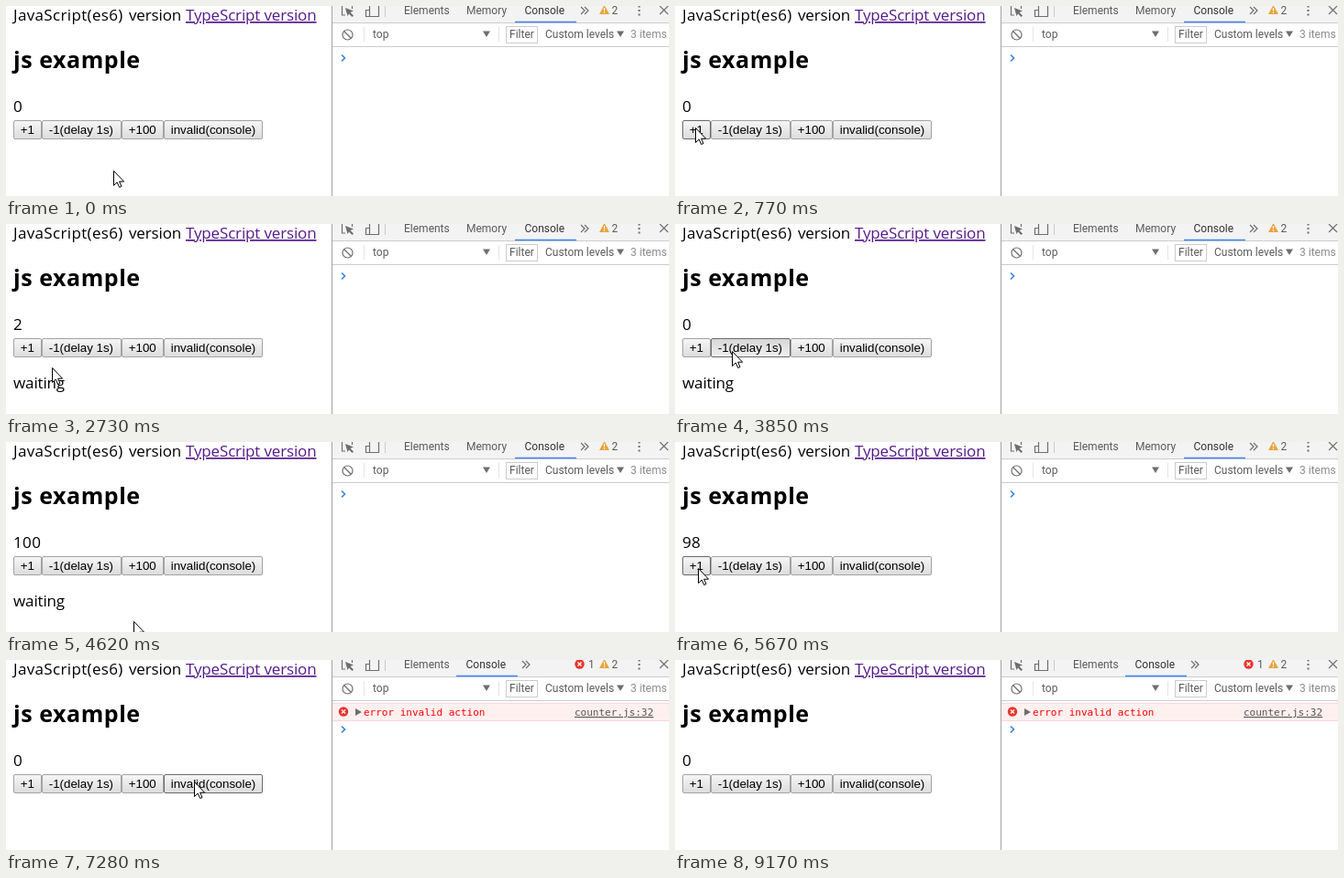
An HTML page that plays this animation: 723 by 208 pixels, repeating every 9730 ms.

```html
<!DOCTYPE html>
<html lang="en">
<head>
<meta charset="utf-8">
<title>Counter example</title>
<style>
html, body { margin: 0; width: 723px; height: 208px; overflow: hidden; background: #fff; }
svg { display: block; }
text { white-space: pre; }
.page { font: 17px "Open Sans", sans-serif; letter-spacing: -.15px; }
.title { font: bold 25px "Open Sans", sans-serif; letter-spacing: .55px; }
.wide { letter-spacing: .35px; }
.link { fill: #551a8b; text-decoration: underline; text-decoration-thickness: 1px; }
.button text { font: 13.33px "Liberation Sans", Arial, sans-serif; }
.button rect { fill: url(#face); stroke: #a3a3a3; }
.button.hover rect { stroke: #6a6a6a; }
.button.active rect { fill: url(#pressed); }
.tools { font: 12px Roboto, sans-serif; fill: #5a5a5a; }
.log { font: 11px "DejaVu Sans Mono", monospace; }
.icon { fill: none; stroke: #6e6e6e; stroke-width: 1.2; }
.rule { fill: none; stroke: #ccc; }
</style>
</head>
<body>
<svg width="723" height="208" viewBox="0 0 723 208">
  <defs>
    <linearGradient id="face" x2="0" y2="1"><stop stop-color="#f6f6f6"/><stop offset="1" stop-color="#dcdcdc"/></linearGradient>
    <linearGradient id="pressed" x2="0" y2="1"><stop stop-color="#d6d6d6"/><stop offset="1" stop-color="#f0f0f0"/></linearGradient>
    <g id="fail"><circle r="5.2" fill="#e8352e"/><path d="M-2-2 2 2M2-2-2 2" stroke="#fff" stroke-width="1.3"/></g>
  </defs>

  <g class="page">
    <text class="wide" x="8" y="16">JavaScript(es6)</text>
    <text x="134" y="16">version</text>
    <text class="link" x="196" y="16">TypeScript version</text>
    <text class="title" x="8" y="68">js example</text>
    <text class="wide" id="count" x="8" y="116">0</text>
    <text id="waiting" x="8" y="180">waiting</text>
  </g>
  <g id="buttons"></g>

  <g class="tools">
    <rect x="356" width="367" height="18" fill="#f3f3f3"/>
    <path class="rule" d="M356 18.5H723M356 44.5H723M413.5 0V12"/>
    <path class="rule" d="M390.5 23V39M537.5 23V39" opacity=".5"/>
    <path d="M355.5 0V208" stroke="#a3a3a3"/>

    <path class="icon" d="M370 10H366.5V0M377.5 0V3"/>
    <path d="M370 2 379 5.500 375.5 7 379 10.500 377.5 12 374 8.500 372.5 11Z" fill="#6e6e6e"/>
    <path class="icon" d="M396.5 0V11.500H406.5V0M396.5 4.500H392.5V11.500H396.5"/>
    <text x="434" y="9">Elements</text>
    <text id="memory" x="502" y="9">Memory</text>
    <g id="tab">
      <text x="565.5" y="9" fill="#333">Console</text>
      <path d="M555 17.500H622" stroke="#4285f4" stroke-width="1.6"/>
      <path class="icon" d="M627 1 631 5 627 9M631 1 635 5 631 9"/>
    </g>
    <g id="badge"><use href="#fail" x="625.5" y="4.500"/><text x="635" y="9">1</text></g>
    <path d="M652.5 -1 658 9H647Z" fill="#e9a23b"/>
    <path d="M652.5 2V5.500M652.5 6.500V8" stroke="#fff" stroke-width="1.2"/>
    <text x="660.5" y="9">2</text>
    <path d="M690.5 0V1.500M690.5 4V6M690.5 8.500V10.500" stroke="#6e6e6e" stroke-width="2"/>
    <path class="icon" d="M713 0 722 9M722 0 713 9"/>

    <circle class="icon" cx="372.5" cy="31.5" r="5.5" stroke-width="1.5"/>
    <path class="icon" d="M368.5 27.500 376.5 35.500"/>
    <text x="400" y="35">top</text>
    <path d="M520 27.500H528L524 34ZM666 27.500H674L670 34Z" fill="#6e6e6e"/>
    <rect x="545.5" y="22.500" width="34" height="18" fill="#fff" stroke="#ccc"/>
    <text x="549" y="35">Filter</text>
    <text x="588" y="35">Custom levels</text>
    <text x="681" y="35" fill="#8a8a8a">3 items</text>
  </g>

  <g id="error" class="log">
    <rect x="356" y="47" width="367" height="19" fill="#fff0f0"/>
    <path d="M356 47.500H723M356 66.500H723" stroke="#ffd6d6"/>
    <use href="#fail" x="368" y="56.500"/>
    <path d="M381 53 388 57 381 61Z" fill="#6e6e6e"/>
    <text x="390" y="61" fill="#f00">error invalid action</text>
    <text x="620" y="61" fill="#545454" text-decoration="underline">counter.js:32</text>
  </g>
  <path id="prompt" d="M366 53.500 369.5 57 366 60.500" fill="none" stroke="#3b82e0" stroke-width="1.6"/>

  <path id="cursor" d="M.5.5V16.500L4.200 13 6.700 18.500 9 17.500 6.600 12.200H11.600Z" fill="#fff" stroke="#000"/>
</svg>
<script>
const LOOP = 9730, TICK = 70, DELAY = 980, LEAVE = 9170;
const $ = id => document.getElementById(id);

// Each action changes the page state when its button is released.
const add = n => s => { s.count += n; };
const ask = s => { s.waiting = true; };
const answer = s => { s.count--; s.waiting = false; };
const fail = s => { s.count = 0; s.failed = true; };

const buttons = [
  { label: "+1", width: 31, action: add(1), clicks: [980, 1120, 5880, 6020] },
  { label: "-1(delay 1s)", width: 87, action: ask, later: answer, clicks: [2100, 2240, 3710, 3920] },
  { label: "+100", width: 46, action: add(100), clicks: [4270] },
  { label: "invalid(console)", width: 108, action: fail, clicks: [6930] }
];

let edge = 8;
for (const b of buttons) {
  b.left = edge;
  edge += b.width;
  $("buttons").innerHTML += `<g class="button">
    <rect x="${b.left + .5}" y="125.5" width="${b.width - 1}" height="20" rx="1.5"/>
    <text x="${b.left + 7.7}" y="140">${b.label}</text></g>`;
}

const events = buttons.flatMap(({ clicks, action, later }) => clicks.flatMap(time =>
  later ? [{ time, run: action }, { time: time + DELAY, run: later }] : [{ time, run: action }]
)).sort((a, b) => a.time - b.time);

function stateAt(t) {
  const state = { count: 0, waiting: false, failed: false };
  for (const { time, run } of events) if (time <= t) run(state);
  return state;
}

// Pointer moves: start, duration, destination
const home = [117, 180];
const moves = [
  [0, 770, 22, 133], [1050, 280, 65, 141], [2240, 490, 50, 157], [3360, 280, 62, 139],
  [3920, 280, 141, 139], [4550, 140, 137, 253], [5180, 560, 20, 133], [6090, 280, 193, 140],
  [6790, 490, 205, 133], [7770, 210, 280, 135], [8400, 280, 215, 141], [9030, 140, 229, 179]
];

function pointerAt(t) {
  let [x, y] = home;
  for (const [start, duration, toX, toY] of moves) {
    const p = Math.min(1, Math.max(0, (t - start) / duration));
    const ease = p * p * (3 - 2 * p);
    x += (toX - x) * ease;
    y += (toY - y) * ease;
  }
  return [Math.round(x), Math.round(y)];
}

const show = (id, on) => $(id).setAttribute("visibility", on ? "visible" : "hidden");
const move = (id, x, y) => $(id).setAttribute("transform", `translate(${x} ${y})`);

function draw(now) {
  const t = Math.floor(now % LOOP / TICK) * TICK;
  const [x, y] = pointerAt(t);
  const { count, waiting, failed } = stateAt(t);
  const inside = t < LEAVE;

  move("cursor", x, y);
  show("cursor", inside);
  buttons.forEach(({ left, width, clicks }, i) => {
    const { classList } = $("buttons").children[i];
    const over = y >= 125 && y < 146 && x > left && x <= left + width;
    classList.toggle("hover", inside && over);
    classList.toggle("active", clicks.includes(t + TICK));
  });
  $("count").textContent = count;
  show("waiting", waiting);
  show("error", failed);
  show("badge", failed);
  show("memory", !failed);
  move("tab", failed ? -64 : 0, 0);
  move("prompt", 0, failed ? 19 : 0);
  requestAnimationFrame(draw);
}
draw(0);
</script>
</body>
</html>
```
